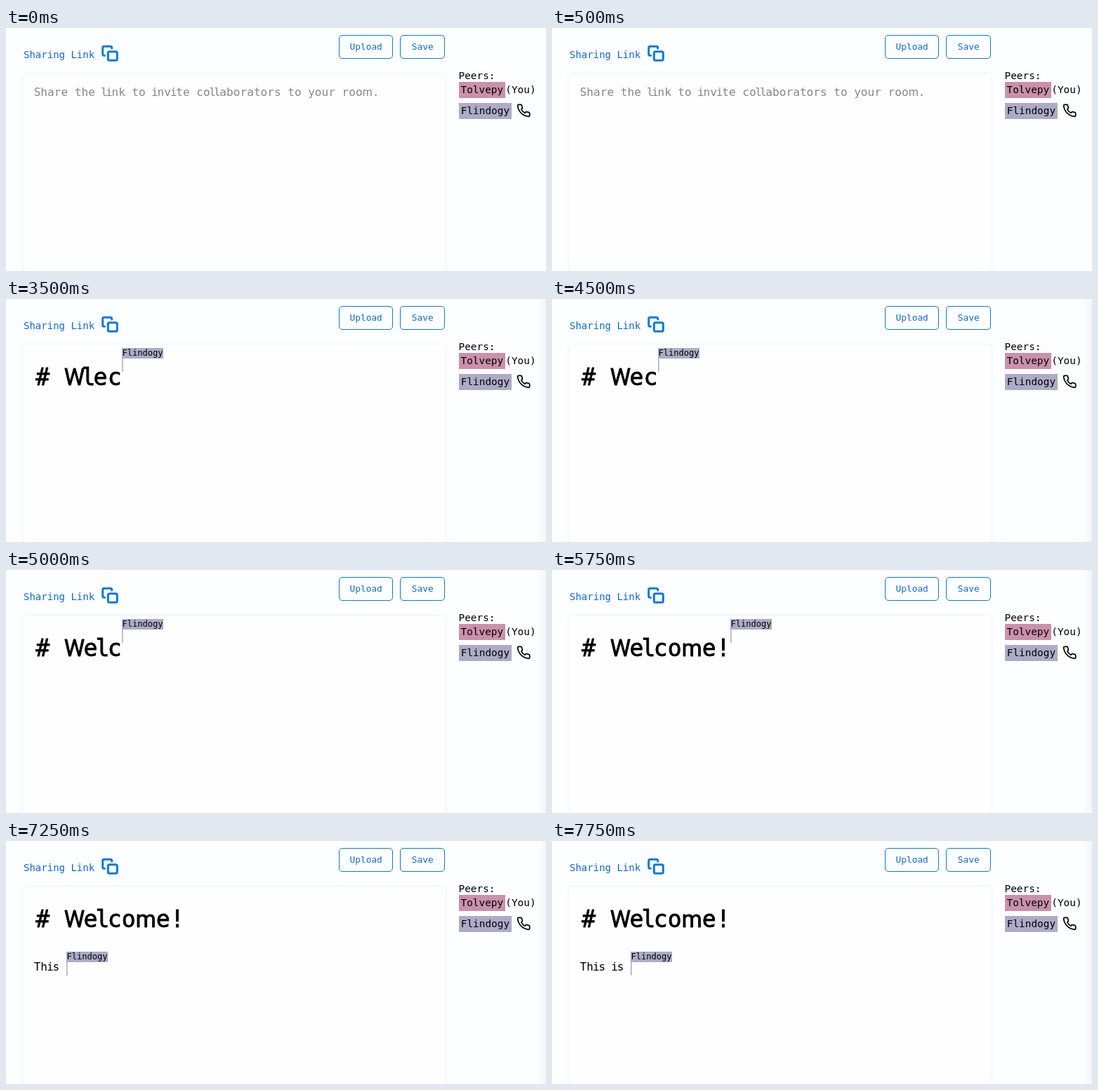
An HTML page that plays this animation: 769 px wide and 347 px high, repeating every 8 s.

```html
<!DOCTYPE html>
<html lang="en">
<head>
<meta charset="utf-8">
<title>Shared editor</title>
<style>
  html, body { margin: 0; width: 100%; height: 100%; overflow: hidden; background: #fcfeff; }
  svg { display: block; width: 769px; height: 347px; }
  text { font-family: "DejaVu Sans Mono", monospace; white-space: pre; }
  .blue { fill: #1268cf; }
  .line { fill: none; stroke: #0b78dc; }
  .side { font-size: 14.4px; }
  .button { font-size: 12.8px; text-anchor: middle; }
  .typed { text-anchor: middle; }
  .wide { font-family: Roboto, sans-serif; }
  #head { stroke: #000; stroke-width: .8px; stroke-linejoin: round; }
</style>
</head>
<body>
<svg viewBox="0 0 769 347" xmlns="http://www.w3.org/2000/svg">
  <defs>
    <linearGradient id="fade">
      <stop offset="0" stop-color="#f3f4f5" stop-opacity="0"/>
      <stop offset="1" stop-color="#f3f4f5"/>
    </linearGradient>
    <filter id="glow" x="-5%" y="-5%" width="110%" height="110%">
      <feGaussianBlur stdDeviation="3"/>
    </filter>
  </defs>
  <rect width="769" height="347" fill="#fcfeff"/>
  <rect id="edge" x="757" width="12" height="347" fill="url(#fade)"/>

  <text class="blue" x="25" y="43" font-size="14">Sharing Link</text>
  <g class="line" stroke-width="3" stroke-linejoin="round" stroke-linecap="round">
    <rect x="145.3" y="33.7" width="13" height="12.6" rx="2"/>
    <path d="M140.5 39.3h-.8a2 2 0 0 1-2-2v-9a2 2 0 0 1 2-2h9a2 2 0 0 1 2 2v.8"/>
  </g>

  <g class="line">
    <rect x="474.5" y="10.5" width="76" height="33" rx="4.5"/>
    <rect x="561.5" y="10.5" width="63" height="33" rx="4.5"/>
  </g>
  <text class="blue button" x="512.7" y="31">Upload</text>
  <text class="blue button" x="593.2" y="31">Save</text>

  <rect x="25" y="66" width="600" height="300" rx="5" fill="#e9f2fb" filter="url(#glow)"/>
  <rect x="25" y="66" width="600" height="300" rx="5" fill="#fefefe"/>

  <g class="side">
    <text x="644.5" y="73">Peers:</text>
    <rect x="645" y="77" width="66" height="23" fill="#cb90aa"/>
    <text x="647.5" y="93">Tolvepy</text>
    <text x="711.3" y="93">(You)</text>
    <rect x="645" y="107" width="75" height="23" fill="#adabc7"/>
    <text x="647.8" y="123">Flindogy</text>
  </g>
  <path transform="translate(726.8 107.6) scale(.86)" fill="none" stroke="#000" stroke-width="2"
    stroke-linecap="round" stroke-linejoin="round"
    d="M22 16.92v3a2 2 0 0 1-2.18 2 19.79 19.79 0 0 1-8.63-3.07 19.5 19.5 0 0 1-6-6 19.79 19.79 0 0 1-3.07-8.67A2 2 0 0 1 4.11 2h3a2 2 0 0 1 2 1.72 12.84 12.84 0 0 0 .7 2.81 2 2 0 0 1-.45 2.11L8.09 9.91a16 16 0 0 0 6 6l1.27-1.27a2 2 0 0 1 2.11-.45 12.84 12.84 0 0 0 2.81.7A2 2 0 0 1 22 16.92z"/>

  <text id="hint" class="typed" y="97" font-size="16" fill="#868686"></text>
  <text id="head" class="typed" y="123" font-size="33"></text>
  <text id="body" class="typed" y="185" font-size="16"></text>
  <g id="caret">
    <rect width="1.6" height="34" fill="#b1aeca"/>
    <rect width="59" height="15" fill="#adabc7"/>
    <text x=".4" y="11" font-size="12.1">Flindogy</text>
  </g>
</svg>
<script>
  const LOOP = 8000, LEFT = 39.6;
  const title = '# Welcome!';
  const steps = [
    [0, ''], [2250, '#'], [2750, '# '], [3000, '# Wl'], [3250, '# Wle'], [3500, '# Wlec'],
    [3750, '# Wl'], [4000, '# We'], [4500, '# Wec'], [4750, '# We'], [5000, '# Welc'],
    [5250, '# Welcom'], [5500, '# Welcome'], [5750, title], [6250, title + '\n'],
    [6500, title + '\n\n'], [6750, title + '\n\nT'], [7000, title + '\n\nThi'],
    [7250, title + '\n\nThis '], [7500, title + '\n\nThis i'], [7750, title + '\n\nThis is ']
  ];
  const caretTops = [70, 134, 158];
  const $ = id => document.getElementById(id);
  const hint = $('hint'), head = $('head'), body = $('body'), caret = $('caret'), edge = $('edge');

  // Relative advance of each letter; narrow and wide ones differ from 1.
  const widths = { '#': 1.26, ' ': .97, i: .75, l: .7, W: 1.3, m: 1.45 };
  const advance = (c, size) => (widths[c] || 1) * size * .608;

  // Centres every letter in its own cell and returns the end of the line.
  function setLine(el, str, size) {
    let x = LEFT;
    const xs = [...str].map(c => {
      const w = advance(c, size);
      x += w;
      return (x - w / 2).toFixed(2);
    });
    el.innerHTML = str.replace(/[Wm]/g, '<tspan class="wide">$&</tspan>');
    el.setAttribute('x', xs.join(' '));
    return x;
  }

  const show = (el, on) => el.setAttribute('visibility', on ? 'visible' : 'hidden');

  let shown = null;
  function draw(t) {
    const text = steps.filter(s => s[0] <= t).pop()[1];
    if (text === shown) return;
    shown = text;
    const lines = text.split('\n');
    const row = lines.length - 1;
    const headEnd = setLine(head, lines[0], 33);
    const bodyEnd = setLine(body, lines[2] || '', 16);
    const x = row ? bodyEnd : headEnd;
    show(hint, !text);
    show(caret, text);
    show(edge, text);
    caret.setAttribute('transform', `translate(${Math.round(x)} ${caretTops[row]})`);
  }

  setLine(hint, 'Share the link to invite collaborators to your room.', 16);
  const start = performance.now();
  function tick() {
    draw((performance.now() - start) % LOOP);
    requestAnimationFrame(tick);
  }
  tick();
</script>
</body>
</html>
```
